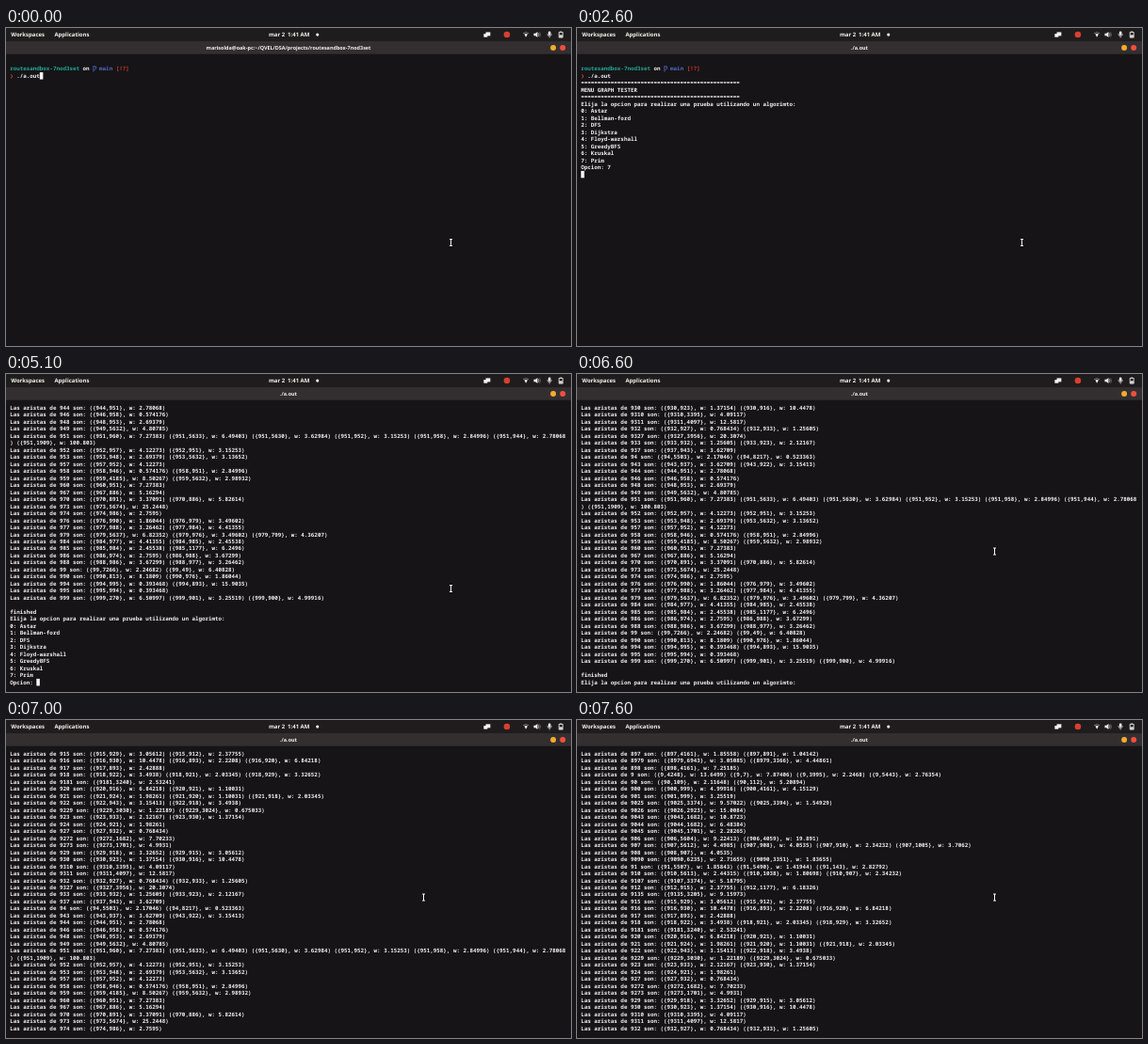
Recreate the animation shown at these times as an HTML page with a canvas. Size 600 by 338 pixels, loop 8 s.

```html
<!DOCTYPE html>
<html lang="es">
<head>
<meta charset="utf-8">
<title>Terminal</title>
<style>
  html, body { margin: 0; width: 100%; height: 100%; overflow: hidden; background: #161417; }
  canvas { display: block; width: 600px; height: 338px; }
</style>
</head>
<body>
<canvas id="stage" width="600" height="338"></canvas>
<script>
const ctx = document.getElementById('stage').getContext('2d');
const LOOP = 8000;

// The desktop is laid out at 1366 x 768 and scaled down to the stage.
const SCREEN = { w: 1366, h: 768 };
const CELL = { w: 8, h: 17 };
const GRID = { x: 9.6, y: 73, rows: 40, cols: 168 };
const MONO = '"Noto Sans Mono", "DejaVu Sans Mono", monospace';
const SANS = '"Open Sans", "Noto Sans", sans-serif';
const COLOR = {
  panel: '#1f1c1d', header: '#332f31', back: '#161417', text: '#f0eef0', bright: '#f6f2f0',
  teal: '#22a893', blue: '#5468c8', red: '#cc3a2c', prompt: '#d0532f',
  amber: '#f5ab2b', close: '#f0503c'
};

const PROJECT = 'routesandbox-7nod3set';
const SHELL_TITLE = 'marisolda@oak-pc:~/QVEL/DSA/projects/' + PROJECT;

const menu = `Elija la opcion para realizar una prueba utilizando un algorimto:
0: Astar
1: Bellman-ford
2: DFS
3: Dijkstra
4: Floyd-warshall
5: GreedyBFS
6: Kruskal
7: Prim
Opcion: `.split('\n');

const edges = `897 son: ({897,4161}, w: 1.85558) ({897,891}, w: 1.04142)
8979 son: ({8979,6943}, w: 3.05085) ({8979,3366}, w: 4.44861)
898 son: ({898,4161}, w: 7.25185)
9 son: ({9,4248}, w: 13.6499) ({9,7}, w: 7.87406) ({9,3995}, w: 2.2468) ({9,5443}, w: 2.76354)
90 son: ({90,109}, w: 2.11648) ({90,112}, w: 5.20894)
900 son: ({900,999}, w: 4.99916) ({900,4161}, w: 4.15129)
901 son: ({901,999}, w: 3.25519)
9025 son: ({9025,3374}, w: 9.57022) ({9025,3394}, w: 1.54929)
9026 son: ({9026,2923}, w: 15.0084)
9043 son: ({9043,1682}, w: 10.8723)
9044 son: ({9044,1682}, w: 6.48384)
9045 son: ({9045,1701}, w: 2.28265)
906 son: ({906,5604}, w: 9.22413) ({906,4059}, w: 19.891)
907 son: ({907,5612}, w: 4.4985) ({907,908}, w: 4.0535) ({907,910}, w: 2.34232) ({907,1005}, w: 3.7062)
908 son: ({908,907}, w: 4.0535)
9090 son: ({9090,6235}, w: 2.71655) ({9090,3351}, w: 1.83655)
91 son: ({91,5507}, w: 1.85843) ({91,5490}, w: 1.41944) ({91,143}, w: 2.82792)
910 son: ({910,5613}, w: 2.44315) ({910,1038}, w: 1.80698) ({910,907}, w: 2.34232)
9107 son: ({9107,3374}, w: 5.18795)
912 son: ({912,915}, w: 2.37755) ({912,1177}, w: 6.18326)
9135 son: ({9135,3205}, w: 9.15973)
915 son: ({915,929}, w: 3.05612) ({915,912}, w: 2.37755)
916 son: ({916,930}, w: 10.4478) ({916,893}, w: 2.2208) ({916,920}, w: 6.84218)
917 son: ({917,893}, w: 2.42888)
918 son: ({918,922}, w: 3.4938) ({918,921}, w: 2.03345) ({918,929}, w: 3.32652)
9181 son: ({9181,3240}, w: 2.53241)
920 son: ({920,916}, w: 6.84218) ({920,921}, w: 1.10031)
921 son: ({921,924}, w: 1.98261) ({921,920}, w: 1.10031) ({921,918}, w: 2.03345)
922 son: ({922,943}, w: 3.15413) ({922,918}, w: 3.4938)
9229 son: ({9229,3030}, w: 1.22189) ({9229,3024}, w: 0.675033)
923 son: ({923,933}, w: 2.12167) ({923,930}, w: 1.37154)
924 son: ({924,921}, w: 1.98261)
927 son: ({927,932}, w: 0.768434)
9272 son: ({9272,1682}, w: 7.70233)
9273 son: ({9273,1701}, w: 4.9931)
929 son: ({929,918}, w: 3.32652) ({929,915}, w: 3.05612)
930 son: ({930,923}, w: 1.37154) ({930,916}, w: 10.4478)
9310 son: ({9310,3395}, w: 4.09117)
9311 son: ({9311,4097}, w: 12.5817)
932 son: ({932,927}, w: 0.768434) ({932,933}, w: 1.25605)
9327 son: ({9327,3956}, w: 20.3074)
933 son: ({933,932}, w: 1.25605) ({933,923}, w: 2.12167)
937 son: ({937,943}, w: 3.62709)
94 son: ({94,5503}, w: 2.17046) ({94,8217}, w: 0.523363)
943 son: ({943,937}, w: 3.62709) ({943,922}, w: 3.15413)
944 son: ({944,951}, w: 2.78068)
946 son: ({946,958}, w: 0.574176)
948 son: ({948,953}, w: 2.69379)
949 son: ({949,5632}, w: 4.80785)
951 son: ({951,960}, w: 7.27383) ({951,5633}, w: 6.49403) ({951,5630}, w: 3.62984) ({951,952}, w: 3.15253) ({951,958}, w: 2.84996) ({951,944}, w: 2.78068) ({951,1909}, w: 100.803)
952 son: ({952,957}, w: 4.12273) ({952,951}, w: 3.15253)
953 son: ({953,948}, w: 2.69379) ({953,5632}, w: 3.13652)
957 son: ({957,952}, w: 4.12273)
958 son: ({958,946}, w: 0.574176) ({958,951}, w: 2.84996)
959 son: ({959,4185}, w: 8.50267) ({959,5632}, w: 2.98932)
960 son: ({960,951}, w: 7.27383)
967 son: ({967,886}, w: 5.16294)
970 son: ({970,891}, w: 3.37091) ({970,886}, w: 5.82614)
973 son: ({973,5674}, w: 25.2448)
974 son: ({974,986}, w: 2.7595)
976 son: ({976,990}, w: 1.86044) ({976,979}, w: 3.49602)
977 son: ({977,988}, w: 3.26462) ({977,984}, w: 4.41355)
979 son: ({979,5637}, w: 6.82352) ({979,976}, w: 3.49602) ({979,799}, w: 4.36207)
984 son: ({984,977}, w: 4.41355) ({984,985}, w: 2.45538)
985 son: ({985,984}, w: 2.45538) ({985,1177}, w: 6.2496)
986 son: ({986,974}, w: 2.7595) ({986,988}, w: 3.67299)
988 son: ({988,986}, w: 3.67299) ({988,977}, w: 3.26462)
99 son: ({99,7266}, w: 2.24682) ({99,49}, w: 6.40828)
990 son: ({990,813}, w: 8.1809) ({990,976}, w: 1.86044)
994 son: ({994,995}, w: 0.393468) ({994,893}, w: 15.9035)
995 son: ({995,994}, w: 0.393468)
999 son: ({999,270}, w: 6.50997) ({999,901}, w: 3.25519) ({999,900}, w: 4.99916)`.split('\n');

const wrap = line => line.match(new RegExp(`.{1,${GRID.cols}}`, 'g'));
const results = [...edges.flatMap(e => wrap('Las aristas de ' + e)), '', 'finished'];
const rule = '='.repeat(48);
const banner = [rule, 'MENU GRAPH TESTER', rule];
const shell = ['', '', ''];
const firstRun = [...shell, ...banner, ...menu];
const answered = [...firstRun.slice(0, -1), 'Opcion: 7'];
const working = [...answered, ''];
const done = [...results, ''];
const again = [...results, ...menu];

// Each step overrides part of the state left by the steps before it.
const steps = [
  { at: 0, lines: shell, prompt: true, title: SHELL_TITLE, scroll: 0, mouse: [472.5, 228] },
  { at: 200, lines: firstRun },
  { at: 300, title: './a.out' },
  { at: 2000, lines: answered },
  { at: 2600, lines: working },
  { at: 4800, lines: done, prompt: false },
  { at: 5100, lines: again },
  { at: 6400, mouse: [456.5, 206] },
  { at: 6500, mouse: [443.5, 188.5], scroll: 3 },
  { at: 6600, scroll: 9 },
  { at: 6700, scroll: 15 },
  { at: 6900, scroll: 18 },
  { at: 7000, scroll: 24 },
  { at: 7200, scroll: 30 },
  { at: 7300, scroll: 36 },
  { at: 7600, scroll: 45 }
];
const stateAt = t => Object.assign({}, ...steps.filter(s => s.at <= t));

function rect(x, y, w, h, color) {
  ctx.fillStyle = color;
  ctx.fillRect(x, y, w, h);
}

function dot(x, y, r, color) {
  ctx.fillStyle = color;
  ctx.beginPath();
  ctx.arc(x, y, r, 0, Math.PI * 2);
  ctx.fill();
}

function label(text, x, y, size, align = 'left') {
  ctx.font = `700 ${size}px ${SANS}`;
  ctx.textAlign = align;
  ctx.fillStyle = COLOR.bright;
  ctx.fillText(text, x, y);
}

function print(text, col, row, color = COLOR.text, weight = 600) {
  ctx.font = `${weight} ${CELL.w / 0.6}px ${MONO}`;
  ctx.textAlign = 'left';
  ctx.fillStyle = color;
  ctx.fillText(text, GRID.x + col * CELL.w, GRID.y + row * CELL.h + 13);
}

function stroke(path, color, width) {
  ctx.strokeStyle = color;
  ctx.lineWidth = width;
  ctx.stroke(new Path2D(path));
}

function drawTray() {
  const c = COLOR.bright;
  rect(1160, 10, 11, 9, c);
  rect(1155, 14, 9, 8, c);
  dot(1211, 16, 7.5, '#d8402f');
  stroke('M1250 13 Q1257 8 1264 13', '#8c898a', 2);
  ctx.fillStyle = c;
  ctx.fill(new Path2D('M1253 15 Q1257 12 1261 15 L1257 22 Z'));
  ctx.fill(new Path2D('M1276 13 h4 l5 -4 v14 l-5 -4 h-4 Z'));
  stroke('M1287 12 q3 4 0 8', c, 1.4);
  stroke('M1290 10 q4 6 0 12', '#8c898a', 1.4);
  ctx.fill(new Path2D('M1311 11 a3 3 0 0 1 6 0 v4 a3 3 0 0 1 -6 0 Z'));
  stroke('M1309 14 q0 6 5 6 q5 0 5 -6 M1314 20 v4', c, 1.4);
  stroke('M1337 10 h9 v13 h-9 Z M1340 9 h3', c, 2);
  rect(1338, 17, 7, 5, c);
}

function drawDesktop(title) {
  rect(0, 0, SCREEN.w, SCREEN.h, COLOR.back);
  rect(0, 0, SCREEN.w, 32, COLOR.panel);
  rect(0, 32, SCREEN.w, 31, COLOR.header);
  label('Workspaces', 12, 20, 13.6);
  label('Applications', 117, 20, 13.6);
  label('mar 2', 635, 20, 13.6);
  label('1:41 AM', 681, 20, 13.6);
  dot(753, 16, 3.6, COLOR.bright);
  drawTray();
  label(title, 683, 52, 12.4, 'center');
  dot(1323, 47.5, 6.8, COLOR.amber);
  dot(1346, 47.5, 6.8, COLOR.close);
}

function drawPrompt() {
  print(PROJECT, 0, 1, COLOR.teal, 700);
  print('on', 22, 1);
  const x = GRID.x + 25 * CELL.w, y = GRID.y + CELL.h;
  stroke(`M${x + 2} ${y + 1} v15 M${x + 3} ${y + 3} h5 v5 l-4 4`, COLOR.blue, 2);
  print('main', 27, 1, COLOR.blue, 700);
  print('[!?]', 32, 1, COLOR.red, 700);
  print('❯', 0, 2, COLOR.prompt, 700);
  print('./a.out', 2, 2);
}

function drawTerminal({ lines, prompt, scroll }) {
  const end = lines.length - scroll;
  const visible = lines.slice(Math.max(0, end - GRID.rows), end);
  visible.forEach((line, row) => print(line, 0, row));
  if (prompt) drawPrompt();
  if (scroll) return;
  const row = visible.length - 1;
  const col = lines === shell ? 9 : visible[row].length;
  rect(GRID.x + col * CELL.w, GRID.y + row * CELL.h, CELL.w, CELL.h, '#f8f8f8');
}

function drawMouse([x, y]) {
  const beam = `M${x - 1.5} ${y - 3.5} h3 M${x} ${y - 3.5} v7 M${x - 1.5} ${y + 3.5} h3`;
  stroke(beam, '#000', 2);
  stroke(beam, '#fff', 1);
}

function frame(now) {
  const state = stateAt(now % LOOP);
  ctx.setTransform(600 / SCREEN.w, 0, 0, 338 / SCREEN.h, 0, 0);
  ctx.textRendering = 'geometricPrecision';
  drawDesktop(state.title);
  drawTerminal(state);
  ctx.setTransform(1, 0, 0, 1, 0, 0);
  drawMouse(state.mouse);
  requestAnimationFrame(frame);
}
requestAnimationFrame(frame);
</script>
</body>
</html>
```
